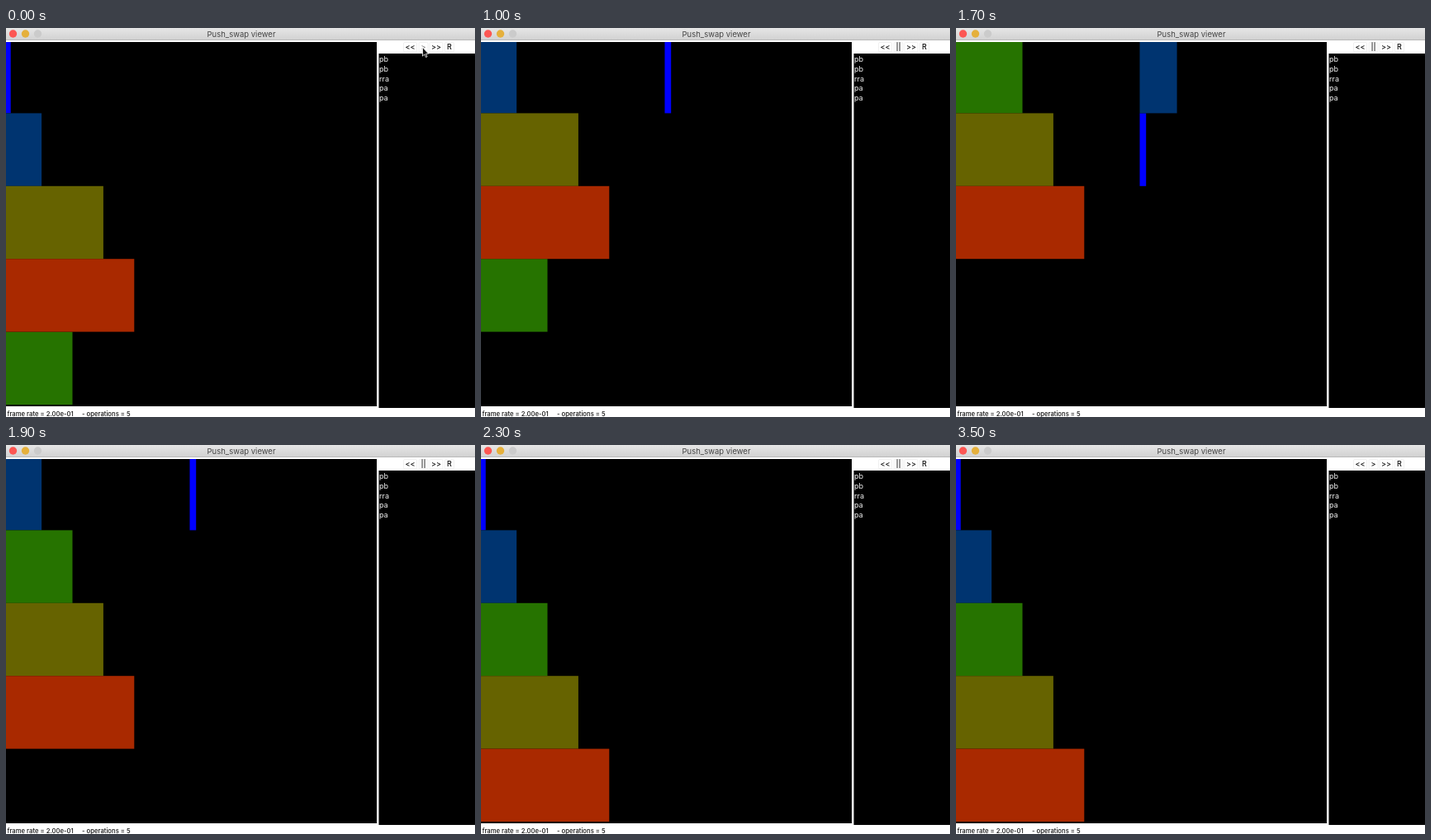
Write an HTML page that moves like this. It is 568 by 472 pixels and loops after 3.9 s.

```html
<!DOCTYPE html>
<html lang="en">
<head>
<meta charset="utf-8">
<title>Push_swap viewer</title>
<style>
html, body { margin: 0; width: 100%; height: 100%; overflow: hidden; background: #fff; }
svg { display: block; width: 568px; height: 472px; font-family: Inter, "Open Sans", sans-serif; }
.title { font-size: 9.5px; fill: #454545; text-anchor: middle; }
.key { fill: #fff; stroke: #ececec; stroke-width: .8; }
.label { font-size: 9px; font-weight: 500; fill: #111; text-anchor: middle; }
.op { font-size: 9px; fill: #f2f2f2; }
.status { font-size: 7.7px; font-weight: 500; fill: #111; }
</style>
</head>
<body>
<svg viewBox="0 0 568 472">
  <defs>
    <linearGradient id="chrome" x2="0" y2="1">
      <stop stop-color="#e6e6e6"/><stop offset="1" stop-color="#d2d2d2"/>
    </linearGradient>
    <clipPath id="view"><rect y="17" width="449" height="442"/></clipPath>
  </defs>
  <rect width="568" height="472" fill="#fff"/>
  <rect width="568" height="14" fill="url(#chrome)"/>
  <rect y="14" width="568" height="1" fill="#b9b9b9"/>
  <circle cx="8.5" cy="7" r="4.7" fill="#fc5753"/>
  <circle cx="23.5" cy="7" r="4.7" fill="#e5b03c"/>
  <circle cx="38.5" cy="7" r="4.7" fill="#cbcbcb"/>
  <text class="title" x="285" y="10.5">Push_swap viewer</text>

  <rect y="17" width="449" height="442"/>
  <g id="bars" clip-path="url(#view)"></g>
  <rect x="451.5" y="31" width="116.5" height="430"/>
  <g id="keys"></g>
  <g id="ops"></g>
  <path id="cursor" d="M504.5 23.5v10.6l2.4-2.2 1.6 3.6 1.6-.7-1.6-3.5h3.2z" fill="#111" stroke="#fff" stroke-width=".8"/>
  <text class="status" x="1.5" y="471">frame rate = 2.00e-01</text>
  <text class="status" x="92" y="471">- operations = 5</text>
</svg>
<script>
const LOOP = 3900, PLAY = 100, STOP = 2500, HIDE = 500;
const ROW = 88.4, TOP = 15, LEFT = [-2, 222.5];
const COLORS = ['#0000ff', '#003470', '#267300', '#666300', '#a92900'];
const START = [0, 1, 3, 4, 2];
const OPS = [[500, 'pb'], [1100, 'pb'], [1500, 'rra'], [1900, 'pa'], [2300, 'pa']];
const MOVES = {
  pb: (a, b) => b.unshift(a.shift()),
  pa: (a, b) => a.unshift(b.shift()),
  rra: a => a.unshift(a.pop())
};
const $ = id => document.getElementById(id);

function add(parent, tag, attrs, text = '') {
  const el = document.createElementNS('http://www.w3.org/2000/svg', tag);
  for (const k in attrs) el.setAttribute(k, attrs[k]);
  el.textContent = text;
  return parent.appendChild(el);
}

const bars = COLORS.map((fill, i) =>
  add($('bars'), 'rect', { fill, width: 7.7 + 37.4 * i, height: ROW }));

const labels = [['<<', 489.5, 16], ['>', 505.5, 11], ['>>', 521, 16], ['R', 537, 11]].map(([s, x, w]) => {
  add($('keys'), 'rect', { class: 'key', x: x - w / 2, y: 17.5, width: w, height: 11.5, rx: 1.5 });
  return add($('keys'), 'text', { class: 'label', x, y: 26.3 }, s);
});

OPS.forEach(([, name], i) => add($('ops'), 'text', { class: 'op', x: 452, y: 41 + 11.8 * i }, name));

function draw() {
  const t = performance.now() % LOOP;
  const stacks = [[...START], []];
  for (const [at, name] of OPS) if (t >= at) MOVES[name](...stacks);
  stacks.forEach((stack, s) => stack.forEach((n, row) => {
    bars[n].setAttribute('x', LEFT[s]);
    bars[n].setAttribute('y', TOP + ROW * row);
  }));
  labels[1].textContent = t >= PLAY && t < STOP ? '||' : '>';
  labels[1].style.fill = t < PLAY ? '#888' : '';
  $('cursor').style.display = t < HIDE ? '' : 'none';
  requestAnimationFrame(draw);
}
draw();
</script>
</body>
</html>
```
